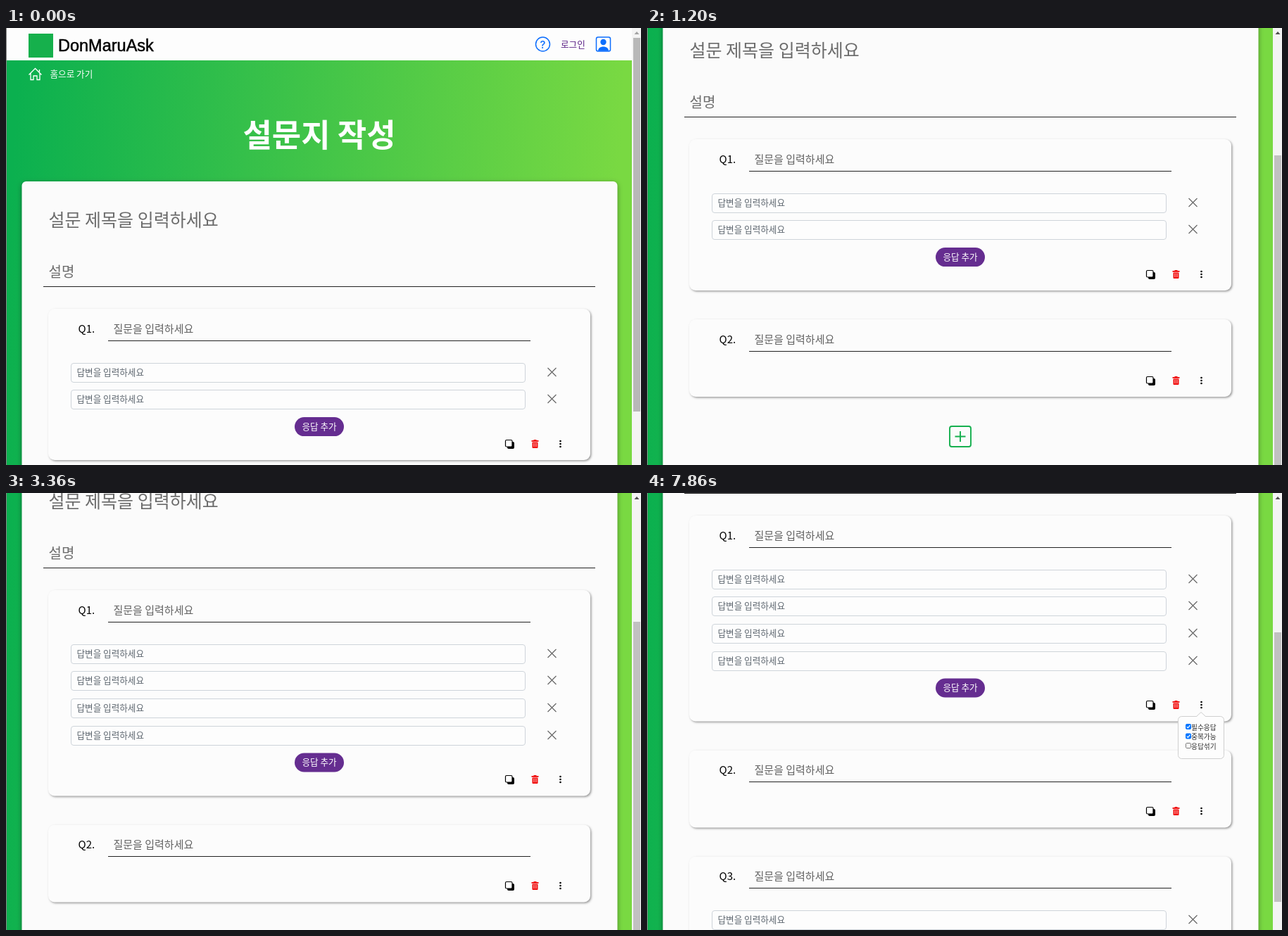
Write an HTML page with a canvas that moves like this. It is 902 px wide and 621 px high and loops after 8 s.

```html
<!DOCTYPE html>
<html lang="ko">
<head>
<meta charset="utf-8">
<title>설문지 작성</title>
<style>
  html, body { margin: 0; width: 100%; height: 100%; overflow: hidden; background: #fbfbfb; }
  canvas { display: block; }
</style>
</head>
<body>
<canvas id="stage" width="902" height="621"></canvas>
<script>
const LOOP = 8000, TICK = 30, WIDTH = 902, HEIGHT = 621;
const PAGE_WIDTH = 889, ANSWER_STEP = 38.7, FIRST_CARD = 399, CARD_GAP = 41;
const KOREAN = '"Noto Sans CJK KR", "Noto Sans CJK", "Noto Sans KR", sans-serif';
const c = document.getElementById('stage').getContext('2d');

// Scroll moves: start time, end time, from, to
const SCROLLS = [
  [600, 804, 0, 158],
  [990, 1347, 158, 289],
  [1347, 1500, 289, 210],
  [3275, 3499, 210, 367]
];

const clamp = v => Math.max(0, Math.min(1, v));
const smooth = u => u * u * (3 - 2 * u);

function scrollAt(t) {
  let y = 0;
  for (const [start, end, from, to] of SCROLLS)
    if (t >= start) y = from + (to - from) * smooth(clamp((t - start) / (end - start)));
  return Math.round(y);
}

function text(str, x, centerY, size, color, weight = 400, align = 'left', family = KOREAN) {
  c.font = `${weight} ${size}px ${family}`;
  c.textAlign = align;
  c.fillStyle = color;
  c.fillText(str, x, centerY + size * 0.37);
}

function box(x, y, w, h, r, fill, stroke, lineWidth = 1) {
  c.beginPath();
  c.roundRect(x, y, w, h, r);
  if (fill) { c.fillStyle = fill; c.fill(); }
  if (stroke) { c.strokeStyle = stroke; c.lineWidth = lineWidth; c.stroke(); }
}

function rect(x, y, w, h, color) {
  c.fillStyle = color;
  c.fillRect(x, y, w, h);
}

function disc(x, y, r, color) {
  c.fillStyle = color;
  c.beginPath();
  c.arc(x, y, r, 0, 7);
  c.fill();
}

function strokePath(d, color, width) {
  c.strokeStyle = color;
  c.lineWidth = width;
  c.stroke(new Path2D(d));
}

function shadowed(dx, dy, blur, color, draw) {
  c.save();
  c.shadowOffsetX = dx;
  c.shadowOffsetY = dy;
  c.shadowBlur = blur;
  c.shadowColor = color;
  draw();
  c.restore();
}

function header() {
  const blue = '#0d6efd';
  rect(0, 0, PAGE_WIDTH, 46, '#fdfdfd');
  rect(32, 8, 35, 34, '#16b04c');
  c.strokeStyle = '#000';
  c.lineWidth = 0.5;
  text('DonMaruAsk', 74, 24.5, 23.5, '#000', 400, 'left', '"Liberation Sans", Arial, sans-serif');
  c.strokeText('DonMaruAsk', 74, 24.5 + 23.5 * 0.37);

  c.strokeStyle = blue;
  c.lineWidth = 1.5;
  c.beginPath();
  c.arc(762.5, 23, 10, 0, 7);
  c.stroke();
  text('?', 762.5, 23, 15, blue, 500, 'center', 'Inter, sans-serif');
  text('로그인', 788, 23, 12.6, '#5b2186', 500);

  box(838.5, 13, 20, 20, 2.5, null, blue, 1.5);
  disc(848.5, 20, 4.2, blue);
  c.fill(new Path2D('M841 32.5C841 24.5 856 24.5 856 32.5Z'));

  strokePath('M32.5 66.5L41.5 57.5L50.5 66.5M35 64.5V73.5H39V68H44V73.5H48V64.5M47.5 59V62.5', '#fff', 1.3);
  text('홈으로 가기', 62.5, 65.5, 12.6, '#fff', 500);
  text('설문지 작성', 445, 152, 45, '#fff', 700, 'center');
}

function cardTools(y) {
  box(712, y - 3, 10, 10, 2, '#000');
  box(709.5, y - 5.5, 9.5, 9.5, 1.5, '#fff', '#000', 1.2);

  const red = '#f00b0b';
  rect(746.5, y - 5, 10, 1.8, red);
  rect(749.5, y - 6, 4, 1.2, red);
  box(747.5, y - 2.6, 8, 8.6, 1, red);
  for (const x of [749.2, 751.2, 753.2]) rect(x, y - 1.4, 0.7, 5.6, '#ffd5d5');

  for (const dy of [-4, 0, 4]) disc(787.5, y + dy, 1.3, '#000');
}

function cardHeight(answers) {
  return answers ? 137.6 + answers * ANSWER_STEP : 110;
}

function questionCard(number, top, answers) {
  const height = cardHeight(answers);
  shadowed(1.5, 1.5, 3, 'rgba(0,0,0,.38)', () => box(60, top, 770, height, 9, '#fcfcfc'));
  text(`Q${number}.`, 102.5, top + 28, 15, '#000', 500);
  text('질문을 입력하세요', 152.5, top + 28, 15, '#626262');
  rect(145, Math.round(top + 45), 600, 1, '#222');

  for (let i = 0; i < answers; i++) {
    const y = Math.round(top + 76.7 + i * ANSWER_STEP);
    box(92.5, y + 0.5, 645, 27, 3.5, '#fdfdfd', '#ced4da');
    text('답변을 입력하세요', 100.5, y + 13.5, 12.6, '#5d666f');
    strokePath(`M769.5 ${y + 7}l12 12m0-12l-12 12`, '#6c6c6c', 1.3);
  }
  if (answers) {
    const y = top + 76.7 + answers * ANSWER_STEP;
    box(410, y, 70, 27, 13.5, '#652d90');
    text('응답 추가', 445, y + 13, 12.6, '#fff', 500, 'center');
  }
  cardTools(Math.round(top + height - 23));
}

function addButton(y) {
  box(430, y + 1, 30, 29, 3, null, '#16b04f', 1.9);
  strokePath(`M437.5 ${y + 15.5}h15m-7.5-7.5v15`, '#16b04f', 1.9);
}

function checkbox(label, y, checked, fill, border) {
  box(765.5, y - 4, 7, 7, 1.2, checked ? fill : '#fff', checked ? fill : border);
  if (checked) strokePath(`M766.8 ${y - 0.3}l1.6 1.7l3-3.8`, '#fff', 1.2);
  text(label, 773, y + 0.5, 9.7, '#2c2c2c');
}

function popover(t) {
  const opacity = clamp((t - 5310) / 150);
  if (!opacity) return;
  c.save();
  c.globalAlpha = opacity;
  box(754.5, 684.5, 65, 60, 5, '#fdfdfd', '#cfcfcf');
  c.fillStyle = '#fdfdfd';
  c.fill(new Path2D('M780 685.5L787 678.5L794 685.5Z'));
  strokePath('M780.5 684.5L787 678.5L793.5 684.5', '#cfcfcf', 1);

  const border = t < 7500 || t >= 7710 ? '#767676' : t < 7620 ? '#4f4f4f' : '#8d8d8d';
  checkbox('필수응답', 699.5, true, '#0075ff', '#767676');
  checkbox('중복가능', 713, t >= 7710, t < 7860 ? '#005cc8' : '#0075ff', border);
  checkbox('응답섞기', 726.5, false, '#0075ff', '#767676');
  c.restore();
}

function scrollbar(t, scroll, pageHeight) {
  const ratio = 732 / pageHeight;
  const thumb = t < 120 ? '#b8b8b8' : t < 150 ? '#bdbdbd' : '#c1c1c1';
  rect(PAGE_WIDTH, 0, 13, HEIGHT, '#f4f4f4');
  rect(891, Math.round(14 + scroll * ratio), 10, Math.round(766 * ratio), thumb);
  c.fillStyle = scroll ? '#505050' : '#a3a3a3';
  c.fill(new Path2D('M892.5 9L896 5L899.5 9Z'));
}

function render(t) {
  const scroll = scrollAt(t);
  const answers = t < 2280 ? 2 : t < 3090 ? 3 : 4;
  const hasThird = t >= 4320;
  const pageHeight = 1055 + (answers - 2) * ANSWER_STEP + (hasThird ? 331 : 0);

  c.save();
  c.translate(0, -scroll);
  const green = c.createLinearGradient(20, 0, 880, 50);
  green.addColorStop(0, '#0bb04f');
  green.addColorStop(1, '#79d942');
  rect(0, 0, PAGE_WIDTH, pageHeight, green);
  header();
  shadowed(0, 2, 7, 'rgba(0,0,0,.4)', () => box(22.5, 218, 846, pageHeight - 218, 6, '#fbfbfb'));
  text('설문 제목을 입력하세요', 60.5, 272.5, 25, '#6c6c6c');
  text('설명', 60.5, 346.5, 20, '#6c6c6c');
  rect(53, 367, 784, 1, '#222');

  const counts = hasThird ? [answers, 0, 2] : [answers, 0];
  let top = FIRST_CARD;
  counts.forEach((count, i) => {
    questionCard(i + 1, top, count);
    top += cardHeight(count) + CARD_GAP;
  });
  addButton(Math.round(top));
  popover(t);
  c.restore();

  rect(0, 0, 1, HEIGHT, '#868686');
  scrollbar(t, scroll, pageHeight);
}

const began = performance.now();
function frame() {
  const t = (performance.now() - began) % LOOP;
  render(Math.floor(t / TICK) * TICK);
  requestAnimationFrame(frame);
}
frame();
</script>
</body>
</html>
```
